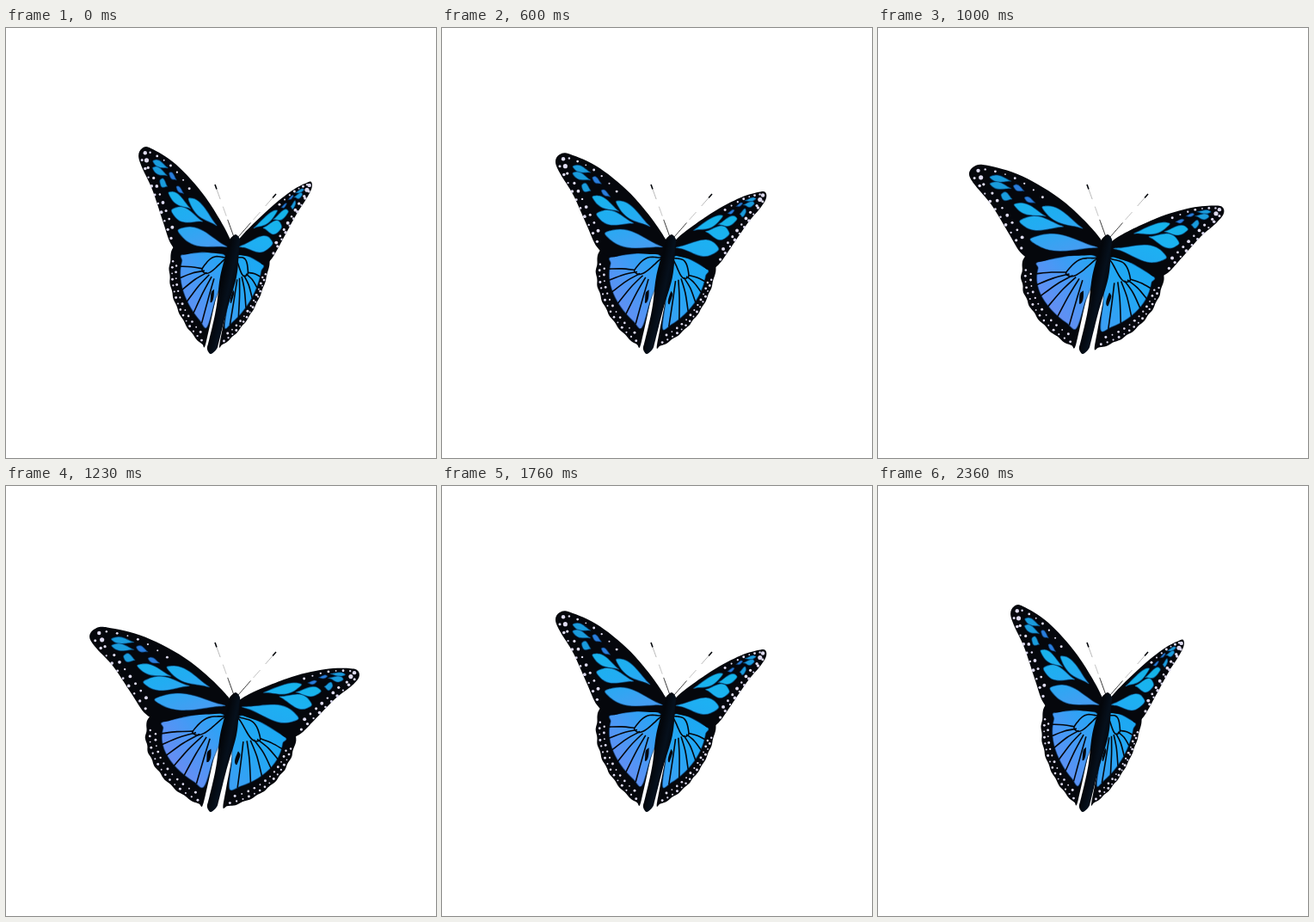
Recreate the animation shown at these times as an HTML page with a canvas. Size 500 px wide and 500 px high, loop 2.4 s.

```html
<!DOCTYPE html>
<html lang="en">
<head>
<meta charset="utf-8">
<title>Butterfly</title>
<style>
html, body { margin: 0; width: 100%; height: 100%; overflow: hidden; background: #fff; }
canvas { display: block; width: 500px; height: 500px; }
</style>
</head>
<body>
<canvas id="stage" width="500" height="500"></canvas>
<script>
const ctx = document.getElementById('stage').getContext('2d');
const BLACK = '#05070c';
const HEAD = [266, 243];
const AXIS = [-.204, .979];   // direction of the body
const STEPS = 72, SPREAD = 34;

// Both sides share one wing: s runs from the body (0) to the tip (1), v runs along the body in pixels.
// tip: tip offset when spread; dx, dy, tilt: swing; reach, ahead: foreshortening.
const left = {
  tip: [-168, -71], dx: -44.1, dy: 27.1, tilt: -8, reach: 1, ahead: 1,
  forePaint: () => gradient(190, 185, 215, 262, '#16b4ea', '#22acf2', '#459df2'),
  hindPaint: () => gradient(188, 325, 250, 275, '#6b8bf2', '#4c97f5', '#29a4f4')
};
const right = {
  tip: [145, -24], dx: 42.6, dy: 31, tilt: 0, reach: .82, ahead: .6,
  forePaint: () => gradient(320, 215, 300, 275, '#14b4e8', '#1cb2f2', '#22a9f2'),
  hindPaint: () => gradient(262, 345, 310, 280, '#3a9ff4', '#25a6f4', '#1ba9f2')
};

const foreEdge = [
  [.04, 5], [.33, -16], [.645, -22], [.9, -15], [.98, -7], [1, 4],
  [.94, 13], [.81, 25], [.66, 46], [.54, 62], [.42, 62], [.28, 45], [.02, 21]
];
// Leaves: base s, v; end s, v; half width
const foreCells = [
  [.045, 16, .505, 42, 10], [.3, 11, .6, 28, 8.5], [.17, 3, .47, 1, 7.5], [.43, 9, .66, 13, 6]
];
const tipCells = [
  [.71, -11, .86, -4, 4], [.7, -3, .85, 3, 4.2], [.68, 8, .76, 9, 5], [.61, -7, .69, -7, 3.5], [.52, 0, .6, 0, 3]
];

const radians = degrees => degrees * Math.PI / 180;
const mix = (a, b, t) => a + (b - a) * t;
const range = (n, make) => Array.from({ length: n }, (_, i) => make(i / (n - 1)));

function gradient(x0, y0, x1, y1, ...colors) {
  const g = ctx.createLinearGradient(x0, y0, x1, y1);
  colors.forEach((c, i) => g.addColorStop(i / (colors.length - 1), c));
  return g;
}

function swing(phase, step) {
  const angle = k => radians(phase + 2.92 * k);
  return Math.cos(angle(SPREAD)) - Math.cos(angle(step));
}

function projector(side, step) {
  const dx = side.dx * swing(8.2, step);
  const dy = side.dy * swing(side.tilt, step);
  return ([s, v]) => {
    const out = s ** side.reach, lag = out ** 1.08;
    const along = v < 0 ? v * side.ahead : v;
    return [
      HEAD[0] + AXIS[0] * along + side.tip[0] * out + dx * lag,
      HEAD[1] + AXIS[1] * along + side.tip[1] * out + dy * lag
    ];
  };
}

// Smooth curve through the points
function trace(points, closed = true) {
  const n = points.length;
  const at = i => points[closed ? (i + n) % n : Math.max(0, Math.min(n - 1, i))];
  ctx.beginPath();
  ctx.moveTo(...points[0]);
  for (let i = 0; i < (closed ? n : n - 1); i++) {
    const [a, b, c, d] = [at(i - 1), at(i), at(i + 1), at(i + 2)];
    ctx.bezierCurveTo(
      b[0] + (c[0] - a[0]) / 6, b[1] + (c[1] - a[1]) / 6,
      c[0] - (d[0] - b[0]) / 6, c[1] - (d[1] - b[1]) / 6, c[0], c[1]);
  }
}

function fill(points, paint) {
  trace(points);
  ctx.fillStyle = paint;
  ctx.fill();
}

function stroke(points, width, color, closed = false) {
  trace(points, closed);
  ctx.lineWidth = width;
  ctx.strokeStyle = color;
  ctx.stroke();
}

function fillBlue(points, paint) {
  fill(points, paint);
  stroke(points, 1.2, 'rgba(6, 50, 95, .5)', true);
}

// Teardrop, narrow at the base and blunt at the end
function leaf([s0, v0, s1, v1, width]) {
  const edge = way => t => [
    mix(s0, s1, t),
    mix(v0, v1, t) + way * width * Math.max(0, Math.sin(Math.PI * t ** 1.5)) ** .8
  ];
  const back = range(9, edge(1)).slice(1, -1).reverse();
  return [...range(9, edge(-1)), ...back];
}

// Point on the rounded rim of the hind wing
function rim(degrees, wide, long) {
  const sin = Math.sin(radians(degrees));
  return [.05 + .47 * wide * Math.cos(radians(degrees)), 72 + 64 * long * Math.sign(sin) * Math.abs(sin) ** .9];
}

function dots(project, count, radius, path) {
  range(count, path).map(project).forEach(([x, y], i) => {
    ctx.beginPath();
    ctx.arc(x, y, radius * (1 + .25 * Math.sin(i * 2.4)), 0, 2 * Math.PI);
    ctx.fillStyle = '#dedbf0';
    ctx.fill();
  });
}

function drawHind(side, project) {
  const shape = points => points.map(project);
  const scallop = t => 1 + .01 * Math.sin(t * 50);
  const edge = range(40, t => rim(mix(-18, 89, t), scallop(t), scallop(t)));
  fill(shape([...edge, [.053, 113], [.048, 68], [.03, 20]]), BLACK);

  const blue = range(10, t => rim(mix(-14, 86, t), .77, .67));
  fillBlue(shape([...blue, [.055, 85], [.04, 27]]), side.hindPaint());

  stroke(shape(leaf([.03, 27, .22, 60, 9])), 1.6, BLACK, true);
  for (let i = 0; i < 6; i++) {
    const start = [mix(.22, .1, i / 5), 59];
    const end = rim(mix(4, 78, i / 5), .78, .68);
    const bend = [mix(start[0], end[0], .5), mix(start[1], end[1], .45)];
    stroke(shape([start, bend, end]), 1.6, BLACK);
  }
  fill(shape(leaf([.08, 70, .09, 86, 3]).map(([s, v], i) => [s + .014 * Math.sin(i * Math.PI / 8), v])), BLACK);

  dots(project, 15, 1.2, t => rim(mix(4, 84, t), .94, .94));
  dots(project, 12, 1.2, t => rim(mix(6, 80, t), .86, .83));
}

function drawFore(side, project) {
  const shape = points => points.map(project);
  fill(shape(foreEdge), BLACK);
  const paint = side.forePaint();
  for (const cell of foreCells) fillBlue(shape(leaf(cell)), paint);
  tipCells.forEach((cell, i) => fillBlue(shape(leaf(cell)), i < 3 ? '#1a9cdc' : '#2a7ddc'));

  dots(project, 10, 1.5, t => [mix(.96, .55, t), mix(5, 56, t)]);
  dots(project, 7, 1.6, t => [mix(.82, .56, t), mix(12, 44, t)]);
  dots(project, 7, 1.2, t => [mix(.9, .48, t), -10 - 6 * Math.sin(Math.PI * t)]);
  dots(project, 3, 2.2, t => [mix(.945, .89, t), mix(-5, 7, t)]);
}

function drawAntenna(base, tip) {
  const part = (from, to, width, color) => {
    const at = t => [mix(base[0], tip[0], t), mix(base[1], tip[1], t)];
    stroke([at(from), at(to)], width, color);
  };
  part(0, .33, .9, '#222');
  part(.4, .58, .6, '#999');
  part(.72, .9, .6, '#888');
  part(.91, 1, 1.6, BLACK);
}

function drawBody() {
  const edge = way => t => {
    const cap = Math.min(1, Math.sqrt(t / .05), Math.sqrt((1 - t) / .05));
    const half = 6 + 3.5 * Math.exp(-(((t - .35) / .2) ** 2));
    const bow = 2 * Math.sin(Math.PI * t);
    return [mix(267, 238, t) + bow + way * half * cap, mix(240, 379, t)];
  };
  const outline = [...range(40, edge(-1)), ...range(40, edge(1)).slice(1, -1).reverse()];
  fill(outline, gradient(250, 300, 268, 304, '#03060b', '#06101c', '#03060b'));
}

function draw(step) {
  ctx.fillStyle = '#fff';
  ctx.fillRect(0, 0, 500, 500);
  for (const side of [left, right]) {
    const project = projector(side, step);
    drawHind(side, project);
    drawFore(side, project);
  }
  drawAntenna([265, 243], [243, 182]);
  drawAntenna([270, 243], [314, 193]);
  drawBody();
}

// Steps last 30, 30 and 40 ms in turn; the second half of the loop runs backwards.
function stepAt(time) {
  const part = time % 100;
  const index = 3 * Math.floor(time / 100) + (part < 30 ? 0 : part < 60 ? 1 : 2);
  return Math.min(index, STEPS - 1 - index);
}

const start = performance.now();
function loop() {
  draw(stepAt((performance.now() - start) % 2400));
  requestAnimationFrame(loop);
}
loop();
</script>
</body>
</html>
```
